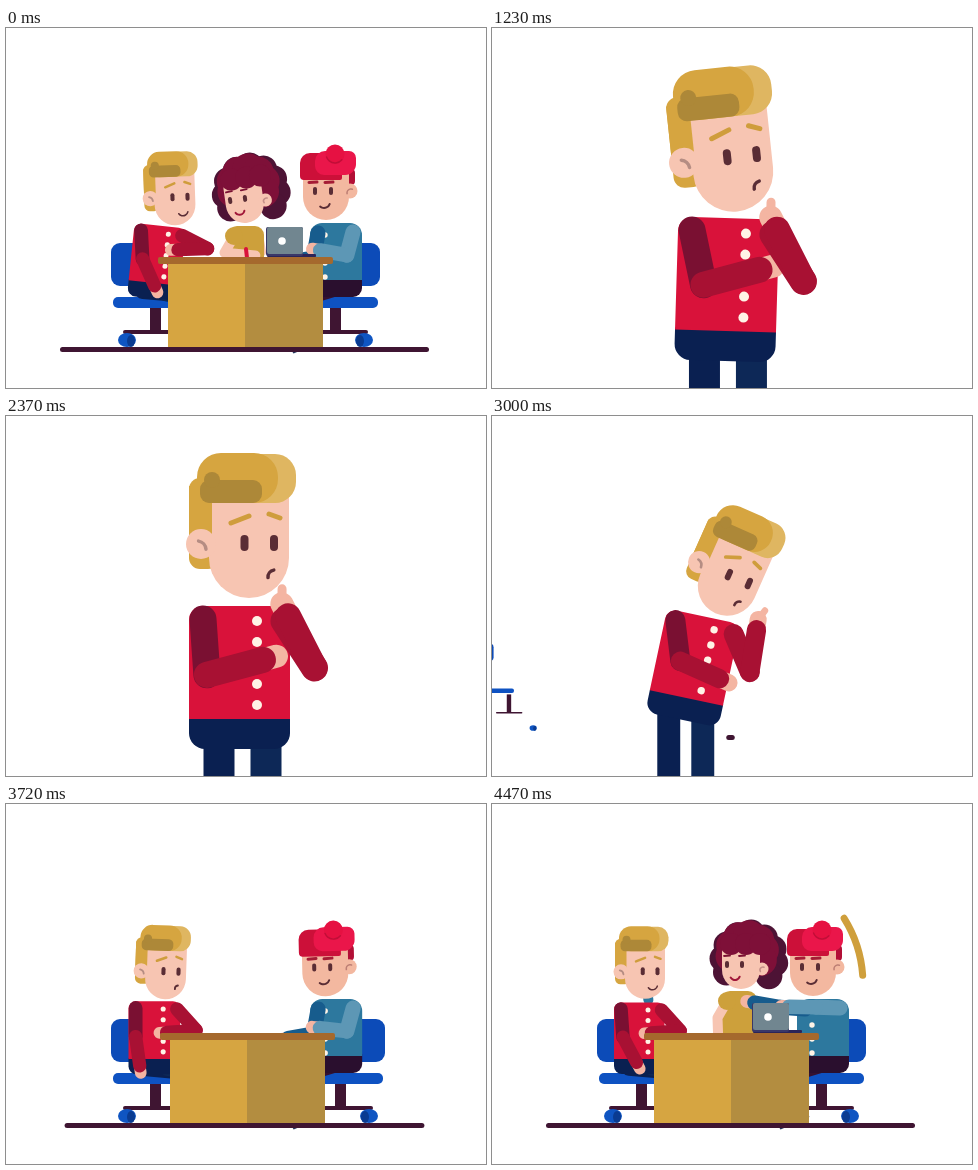
Write an HTML page with a canvas that moves like this. It is 480 px wide and 360 px high and loops after 4500 ms.

```html
<!DOCTYPE html>
<html lang="en">
<head>
<meta charset="utf-8">
<title>Team at work</title>
<style>
html, body { margin: 0; width: 100%; height: 100%; overflow: hidden; background: #fff; }
canvas { display: block; width: 480px; height: 360px; }
</style>
</head>
<body>
<canvas id="stage" width="480" height="360"></canvas>
<script>
const LOOP = 4500;
const ctx = document.getElementById('stage').getContext('2d');
const SKIN = '#f7c5b2', HAND = '#f4b5a2', HAIR = '#d6a540', HAIR_DARK = '#ad8838';
const RED = '#d9123a', SLEEVE = '#a81133', MAROON = '#7a1032', NAVY = '#0a2051';
const BLUE = '#0c4bb8', DARK = '#3f1532', TEAL = '#2d789e', CREAM = '#fff3e6', EYE = '#5a2d35';
const RAD = Math.PI / 180;

const span = (t, a, b) => Math.max(0, Math.min(1, (t - a) / (b - a)));
const smooth = p => p * p * (3 - 2 * p);
const ease = (t, a, b) => smooth(span(t, a, b));

// Blends numbers, lists and poses alike.
function mix(a, b, p) {
  if (typeof a === 'number') return a + (b - a) * p;
  if (Array.isArray(a)) return a.map((v, i) => mix(v, b[i], p));
  return Object.fromEntries(Object.keys(a).map(k => [k, mix(a[k], b[k], p)]));
}
// Starts at a value, then eases to each next one between two times.
const track = (t, start, ...moves) =>
  moves.reduce((value, [from, to, next]) => mix(value, next, ease(t, from, to)), start);

function within(x, y, deg, scale, draw) {
  ctx.save();
  ctx.translate(x, y);
  ctx.rotate(deg * RAD);
  ctx.scale(scale, scale);
  draw();
  ctx.restore();
}
function box(color, x, y, w, h, r = 0) {
  ctx.fillStyle = color;
  ctx.beginPath();
  ctx.roundRect(x, y, w, h, r);
  ctx.fill();
}
function dot(color, x, y, r, ry = r) {
  ctx.fillStyle = color;
  ctx.beginPath();
  ctx.ellipse(x, y, r, ry, 0, 0, 7);
  ctx.fill();
}
function line(color, width, ...points) {
  ctx.strokeStyle = color;
  ctx.lineWidth = width;
  ctx.lineCap = ctx.lineJoin = 'round';
  ctx.beginPath();
  points.forEach(([x, y]) => ctx.lineTo(x, y));
  ctx.stroke();
}
function arc(color, width, x, y, r, from, to) {
  ctx.strokeStyle = color;
  ctx.lineWidth = width;
  ctx.lineCap = 'round';
  ctx.beginPath();
  ctx.arc(x, y, r, from * RAD, to * RAD);
  ctx.stroke();
}
function lobes(color, x, y, ring, r, from, to, count) {
  for (let i = 0; i < count; i++) {
    const a = (from + (to - from) * i / (count - 1)) * RAD;
    dot(color, x + Math.cos(a) * ring, y + Math.sin(a) * ring, r);
  }
}

const step = ([x, y], deg, length) => [x + Math.cos(deg * RAD) * length, y + Math.sin(deg * RAD) * length];
// Stage position of a point in a tilted, scaled torso.
const onTorso = ({ x, y, tilt, size = 1 }) => (px, py) =>
  step(step([x, y], tilt, px * size), tilt + 90, py * size);
// Two bones at absolute angles: start, joint, end.
function limb(start, [upper, fore], a, b) {
  const joint = step(start, upper, a);
  return [start, joint, step(joint, fore, b)];
}

function drawArm([start, joint, end], angle, size, upper, fore, finger) {
  const palm = step(end, angle, 14 * size);
  line(HAND, 23 * size, end, palm);
  if (finger) line(HAND, 9 * size, palm, step(palm, angle + 28, 15 * size));
  line(upper, 27 * size, start, joint);
  line(fore, 26 * size, joint, end);
}
function drawLeg([hip, knee, foot], width, color, shoe, sole, angle) {
  const ankle = mix(knee, foot, .7);
  line(HAND, width * .55, ankle, foot);
  line(color, width, hip, knee, ankle);
  within(foot[0], foot[1], angle, width / 16, () => {
    box(shoe, -17, 0, 34, 14, [6, 9, 3, 3]);
    box(sole, -17, 12, 34, 3, 1);
    line(sole, 1.5, [-2, 2], [3, 7]);
  });
}

const STAND = { size: 1, x: 233, y: 303, tilt: 0, turn: 0, nod: 0,
  back: [86, -15], front: [57, 243], leg: [90, 90], spread: 0 };
const DUCK = { ...STAND, size: .74, x: 194, y: 282, tilt: 12, turn: 24, nod: 6, back: [83, 24], front: [67, 279] };
const SIT = { ...STAND, size: .52, x: 149, y: 258, tilt: -5, turn: -6,
  back: [86, 60], front: [45, 127], leg: [8, 120], spread: 1 };
const DESK = { ...SIT, size: .51, x: 148, y: 255, tilt: 0, turn: 2, nod: 6,
  back: [90, 82], front: [48, 176], leg: [5, 50], spread: 0 };
const HUDDLE = { ...DESK, tilt: 6, turn: -2, nod: 9, back: [87, 66], front: [27, 178] };
const RELAX = { ...DESK, size: .5, x: 147, turn: 0, nod: 1, back: [86, 62] };

function manHead(smile) {
  box(HAIR, -60, -103, 30, 91, 11);
  box(SKIN, -40, -100, 80, 117, [10, 10, 40, 40]);
  box(HAIR, -60, -95, 23, 62);
  box('#dfb661', -10, -127, 57, 49, 21);
  box(HAIR, -52, -128, 81, 50, 24);
  box(HAIR_DARK, -49, -101, 62, 23, 9);
  dot(HAIR_DARK, -37, -101, 8);
  dot(SKIN, -48, -37, 15);
  arc('#b58d83', 3.5, -52, -31, 9, -80, -5);
  for (const x of [-8.5, 21]) box(EYE, x, -46, 8, 16, 4);
  line('#cf9d3c', 5, [-18, -58], [0, -65]);
  line('#cf9d3c', 5, [20, -67], [31, -63]);
  if (smile) arc(EYE, 3, 15, -11, 10, 15, 145);
  else arc(EYE, 3.5, 26, -4, 7, 175, 260);
}

function man(t) {
  const pose = track(t, HUDDLE, [120, 480, STAND], [2400, 3000, DUCK], [3000, 3390, SIT],
    [3390, 3720, DESK], [4060, 4440, RELAX]);
  const sway = ease(t, 570, 1110) - ease(t, 1110, 1640);
  pose.tilt += 2 * sway;
  pose.turn -= 7 * sway;
  pose.nod -= 4 * sway;
  pose.back[0] -= 9 * sway;

  const { size: s, x, y, tilt, turn, nod, back, front, leg: [thigh, shin], spread } = pose;
  const at = onTorso(pose);
  const arm = (start, angles) => limb(start, angles, 56 * s, 58 * s);
  const leg = (px, angles, color) =>
    drawLeg(limb(at(px, 18), angles, 75 * s, 75 * s), 31 * s, color, '#5c4129', '#a98c55', 8);

  leg(-20, [thigh + 22 * spread, shin - 20 * spread], NAVY);
  leg(27, [thigh, shin], '#0d2857');
  within(x, y, tilt, s, () => {
    box(NAVY, -50, -2, 101, 32, [0, 0, 16, 16]);
    box(RED, -50, -113, 101, 113, [14, 14, 0, 0]);
    for (let i = 0; i < 5; i++) dot(CREAM, 18, -98 + i * 21, 5);
  });
  drawArm(arm(at(-36, -100), back), back[1], s, MAROON, SLEEVE);
  const [hx, hy] = at(10, -138);
  within(hx + nod, hy + Math.abs(nod) / 3, turn, s, () => manHead(t < 300 || t > 4200));
  drawArm(arm(at(45, -98), front), front[1], s, SLEEVE, SLEEVE, s > .6);
}

const CHEER = { x: 250, y: 170, lean: 0, turn: 0, left: [235, 241], right: [-27, -35] };
const WATCH = { x: 246, y: 187, lean: -4, turn: 0, left: [120, 88], right: [80, 100] };
const TYPE = { x: 239, y: 198, lean: -8, turn: -8, left: [120, 5], right: [80, 170] };

function girlHead() {
  lobes('#4d1335', 15, -5, 26, 13.5, 150, 400, 9);
  lobes('#7e1038', 13, -12, 16, 16, 165, 390, 7);
  box(SKIN, -12, -18, 38, 43, [6, 6, 19, 19]);
  for (const x of [-3, 12, 26]) dot('#7e1038', x, -20, 11);
  dot(SKIN, 28, 5, 6.5);
  arc('#c58f88', 1.5, 29, 6, 3, 150, 290);
  for (const x of [-7, 8]) {
    box(EYE, x - 2, -3, 4, 7, 2);
    line(MAROON, 1.8, [x - 3, -8], [x + 3, -8.5]);
  }
  arc('#a01638', 2, 1, 11, 5, 20, 150);
}

function girl(t) {
  const pose = t < 600 ? TYPE
    : track(t, { ...CHEER, y: 340 }, [3780, 3990, CHEER], [4080, 4400, WATCH]);
  const { x, y, lean, turn, left, right } = pose;
  const shirt = '#cda03b';
  ctx.save();
  ctx.beginPath();
  ctx.rect(0, 0, 480, 300);
  ctx.clip();
  line(SKIN, 10, ...limb([x + 14, y + 14], right, 12, 24));
  box('#7e1038', x - 17, y + 46, 36, 34);
  box(shirt, x - 17, y, 36, 53, 9);
  line(SKIN, 10, ...limb([x - 12, y + 12], left, 17, 31));
  dot(shirt, x - 11, y + 10, 9);
  if (t < 600) line(RED, 4, [240, 221], [241, 230]);
  within(x + lean, y - 27, turn, 1, girlHead);
  ctx.restore();
}

const LEAN_IN = { x: 330, y: 253, tilt: 0, nod: 0, turn: 0, far: [100, 170], near: [105, 190], leg: [178, 80] };
const WAVE = { x: 456, y: 252, tilt: 10, nod: 4, turn: 16, far: [249, 291], near: [45, 120], leg: [175, 135] };
const PEEK = { ...LEAN_IN, x: 333, nod: -14, turn: -22, far: [105, 165], near: [112, 128] };
const REACH = { ...LEAN_IN, x: 331, far: [184, 190], near: [182, 181] };

function palHead() {
  box('#b20f36', 15, -28, 14, 16, 4);
  box('#f3b8a0', -23, -35, 46, 58, [6, 6, 23, 23]);
  dot('#f3b8a0', 24, -6, 7.5);
  arc('#bd7f74', 1.6, 25, -4, 4, 170, 290);
  box('#cc1039', -26, -44, 42, 27, [10, 4, 2, 4]);
  box('#ea164a', -11, -46, 41, 24, [10, 7, 11, 9]);
  dot('#e61142', 9, -43, 9.5);
  arc('#c10e38', 1.4, 9, -43, 9, 40, 160);
  for (const x of [-11, 5]) {
    box(EYE, x - 2, -10, 4, 8, 2);
    line('#a51c35', 3, [x - 6, -14.5], [x + 2, -15]);
  }
  arc(EYE, 2, -2, 5, 6, 20, 130);
}

function pal(t) {
  const pose = t < 600 ? LEAN_IN
    : track(t, WAVE, [3390, 3690, LEAN_IN], [3690, 3900, PEEK], [4060, 4420, REACH]);
  const { x, y, tilt, nod, turn, far, near, leg: [thigh, shin] } = pose;
  const at = onTorso(pose);
  const leg = (px, angles, color) =>
    drawLeg(limb(at(px, 8), angles, 45, 34), 15, color, '#8db0c6', '#27385f', angles[1] - 95);
  within(t < 600 ? 0 : 150 * (1 - ease(t, 3150, 3390)), 0, 0, 1, () => {
    leg(-10, [thigh, shin], '#210d29');
    leg(-1, [thigh - 15, shin - 8], '#35112f');
    within(x, y, tilt, 1, () => {
      box('#2a0f2e', -25, -3, 51, 19, [0, 0, 9, 6]);
      box(TEAL, -26, -58, 52, 57, [12, 12, 0, 0]);
      for (let i = 0; i < 4; i++) dot(CREAM, -11, -46 + i * 14, 2.7);
    });
    drawArm(limb(at(-18, -48), far, 25, 26), far[1], .56, '#175c8d', '#175c8d');
    drawArm(limb(at(17, -49), near, 24, 27), near[1], .56, '#5d97b5', '#5d97b5');
    const [hx, hy] = at(-10, -84);
    within(hx + nod, hy + Math.abs(nod) / 3, turn, 1, palHead);
  });
}

function chair(offset, grow) {
  const part = (x, y, draw) => within(x + offset, y, 0, grow, draw);
  part(150, 292, () => {
    box(DARK, -6, -34, 11, 46);
    box(DARK, -33, 10, 66, 4, 2);
  });
  part(126, 236, () => box(BLUE, -21, -21, 42, 43, 9));
  part(140, 275, () => box('#0e52c2', -33, -6, 70, 11, 5));
  for (const x of [121, 174]) part(x, 312, () => {
    dot('#0f55c2', 0, 0, 9, 7);
    dot('#0a3b91', 4, 1, 4, 6);
  });
}

function laptop(t) {
  const lift = t < 600 ? 0 : track(t, -90, [3800, 3960, -10], [4060, 4260, 0]);
  within(0, lift, 0, 1, () => {
    box('#2c2458', 261, 226, 49, 3, 1);
    box('#3a3768', 260, 199, 37, 29, 2);
    box('#718690', 261, 199, 36, 27, 2);
    dot('#fff', 276, 213, 3.8);
  });
}

function desk(t) {
  const early = t < 600;
  const height = early ? 83 : track(t, 0, [3240, 3390, 13], [3390, 3600, 87], [3600, 3720, 83]);
  const dx = early ? 0 : track(t, 50, [3240, 3390, 31], [3390, 3680, 2], [4060, 4200, 0]);
  const top = 319 - height;
  box('#d6a541', 162 + dx, top, 77, height);
  box('#b38d40', 239 + dx, top, 78, height);
  box('#a5692d', 152 + dx, top - 7, 175, 7, 2);
}

function swirls(t) {
  if (t < 3840) return;
  const p = span(t, 4020, 4470), sweep = ease(t, 3810, 4020);
  arc('#cf9f3c', 7, 247, 180, 96 + 8 * sweep + 20 * p, -187 + 155 * p * p, -180 + 147 * sweep + 29 * p);
  arc(TEAL, 12 - 2 * p, 247, 180, 80 + 12 * p, 20 - 128 * sweep - 82 * p, 20 - 200 * smooth(p));
  if (t > 3960 && t < 4080) dot('#d5d5d5', 399, 269, 2);
}

function scene(t) {
  const early = t < 600;
  const half = early ? 184 : 3 + 181 * ease(t, 2970, 3800);
  const left = early ? 0 : -138 * (1 - ease(t, 2930, 3540));
  const right = early ? 0 : track(t, 240, [3180, 3390, 123], [3390, 3690, 5], [4060, 4200, 0]);
  swirls(t);
  if (t > 3300 && t < 3480) {
    const go = (t - 3390) * .15;
    line(TEAL, 5, [25 + go, 251], [68 + go, 251]);
    line(TEAL, 5, [57 + go, 270], [80 + go, 270]);
  }
  chair(left, early ? 1 : .35 + .65 * ease(t, 2960, 3200));
  if (early || t > 3180) {
    ctx.save();
    ctx.translate(479 + right, 0);
    ctx.scale(-1, 1);
    chair(0, 1);
    ctx.restore();
  }
  if (early || t > 3780) girl(t);
  if (early || t > 3150) pal(t);
  line(DARK, 5, [240.5 - half, 321.5], [236.5 + half, 321.5]);
}

function frame() {
  const t = performance.now() % LOOP;
  ctx.clearRect(0, 0, 480, 360);
  const shrink = 1 - ease(t, 60, 330);
  const folded = draw => {
    if (t < 330) within(238.5 * (1 - shrink), 321 * (1 - shrink), 0, shrink, draw);
    else if (t > 2960) draw();
  };
  folded(() => scene(t));
  man(t);
  folded(() => {
    if (t < 600 || t > 3800) laptop(t);
    if (t < 600 || t > 3240) desk(t);
  });
  requestAnimationFrame(frame);
}
frame();
</script>
</body>
</html>
```
